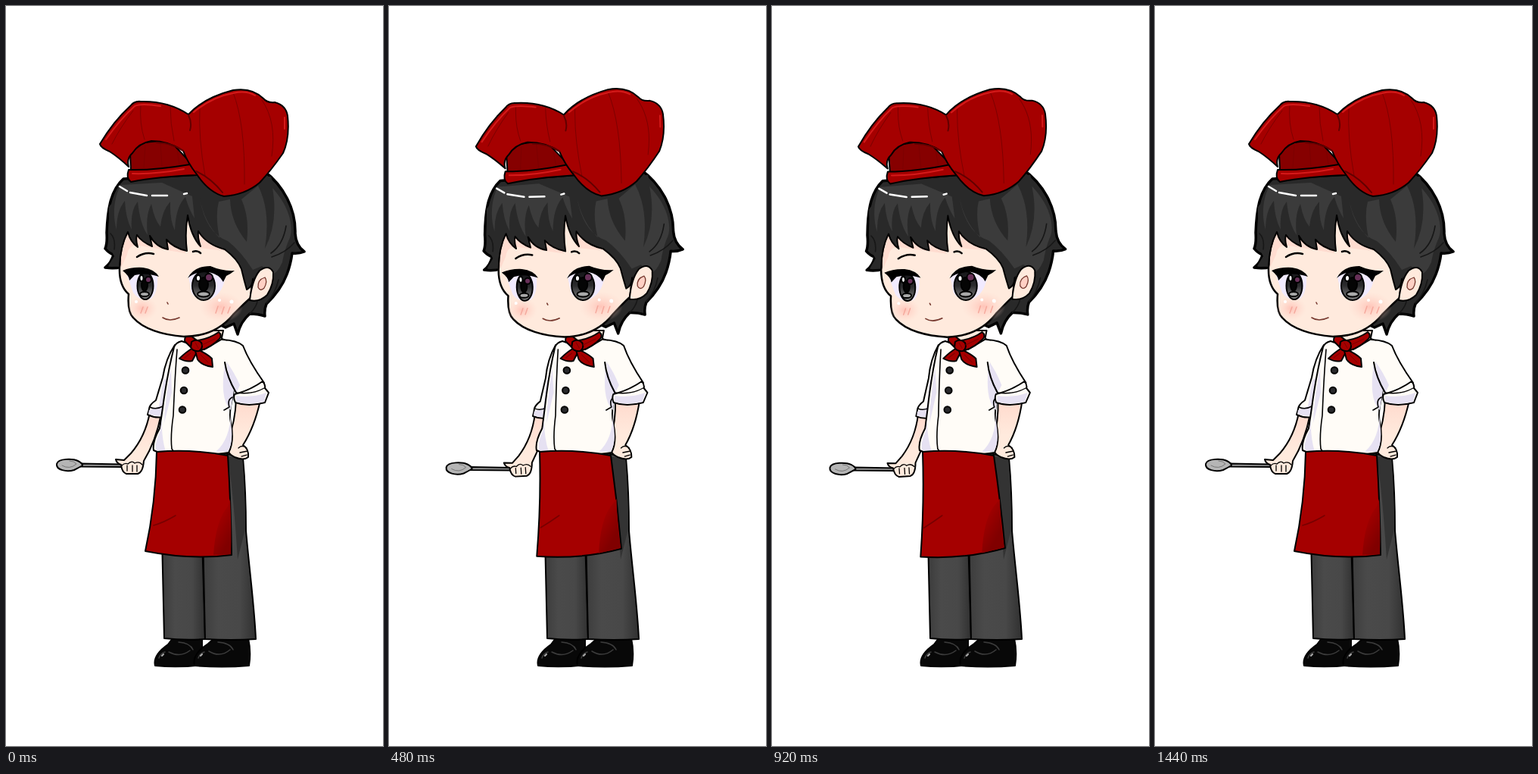
An HTML page for the animation above (1.48 s loop, 498 by 976 pixels).

```html
<!DOCTYPE html>
<html lang="en">
<head>
<meta charset="utf-8">
<title>Chef</title>
<style>
html, body { margin: 0; width: 100%; height: 100%; overflow: hidden; background: #fff; }
svg { display: block; width: 100vw; height: 100vh; }
g { stroke: #000; stroke-width: 2; stroke-linejoin: round; stroke-linecap: round; }
.flat { stroke: none; }
.line { fill: none; }
.skin { fill: #ffeadd; }
.shirt { fill: #fffcf7; }
.lilac { fill: #e6e1f2; stroke: none; }
.red { fill: #a50000; }
.seam { fill: none; stroke: #7d0000; stroke-width: 1; }
.glow { fill: none; stroke: #d51a1a; stroke-width: 2; }
.flush { fill: none; stroke: #f5a99d; stroke-width: 1.5; }
</style>
</head>
<body>
<svg viewBox="0 0 498 976">
  <defs>
    <radialGradient id="blush"><stop stop-color="#ffc4b8"/><stop offset="1" stop-color="#ffd9cd" stop-opacity="0"/></radialGradient>
    <linearGradient id="iris" x2="0" y2="1"><stop stop-color="#151518"/><stop offset=".5" stop-color="#2c2c2e"/><stop offset="1" stop-color="#858585"/></linearGradient>
    <linearGradient id="leg"><stop stop-color="#3c3c3c"/><stop offset=".3" stop-color="#4a4a4a"/><stop offset=".7" stop-color="#484848"/><stop offset="1" stop-color="#303030"/></linearGradient>
    <linearGradient id="cloth" gradientUnits="userSpaceOnUse" x1="262" y1="680" x2="298" y2="700"><stop stop-color="#a50000"/><stop offset=".35" stop-color="#a00000"/><stop offset="1" stop-color="#800000"/></linearGradient>
    <linearGradient id="arm" x2="0" y2="1"><stop stop-color="#ffd9cc"/><stop offset=".6" stop-color="#ffeadd"/></linearGradient>
  </defs>

  <g id="legs">
    <path fill="#080808" d="M197 870C194 858 204 849 214 842L220 834H259V869Q228 873 197 870Z"/>
    <path fill="#080808" d="M249 870C246 858 256 848 267 841L275 834H320Q324 852 321 870Q285 873 249 870Z"/>
    <path class="line" stroke="#3c3c3c" stroke-width="1.5" d="M215 852Q230 860 243 850M268 851Q283 860 296 849M202 860Q204 854 210 852M254 860Q256 854 262 852M228 839Q243 840 247 849M280 839Q296 840 300 849"/>
    <path class="line" stroke="#aaa" stroke-width="2" d="M206 857L208 855M257 857L259 855"/>
    <path fill="url(#leg)" d="M206 700L209 834Q236 837 263 835L259 700Z"/>
    <path fill="url(#leg)" d="M259 650L263 835Q298 837 330 835C328 790 321 740 317 692Q317 640 313 596L289 590Z"/>
    <path class="flat" fill="#333" d="M293 594L312 597Q316 640 316 690L306 730Q301 650 293 594Z"/>
  </g>

  <g id="foreR">
    <path fill="url(#arm)" d="M304 518Q303 548 293 574Q289 589 302 595Q314 600 320 595Q321 584 313 579Q328 556 336 520Z"/>
    <path class="line" stroke-width="1.3" d="M307 583Q312 578 318 583M309 589L319 587M311 594L318 592"/>
  </g>

  <g id="spoon">
    <path fill="#999" d="M98 603.5L154 604.5V608L98 607.5Z"/>
    <path fill="#b5b5b5" d="M67 604C69 596 89 597 95 600Q101 603 101 606Q96 609 90 612C80 615 66 612 67 604Z"/>
    <path fill="none" stroke="#777" stroke-width="1" d="M74 606Q84 612 93 604Q90 600 84 600"/>
  </g>
  <g id="armL">
    <path fill="url(#arm)" d="M190 536Q184 568 165 590L156 599L145 598Q146 603 152 605Q153 615 159 617H174Q181 615 182 600Q198 574 205 538Z"/>
    <path class="line" stroke-width="1.3" d="M153 606Q157 602 161 604Q166 599 170 603Q176 600 180 605M160 606V613M167 606V614M173 606V614"/>
    <path class="shirt" d="M223 447Q211 465 207 490L198 520Q189 526 189 532L187 539Q197 544 208 542L218 500Z"/>
    <path class="lilac" d="M208 493L202 528L189 533L188 538Q198 542 207 540L216 490Z"/>
    <path class="line" stroke-width="1.5" d="M190 529Q198 533 207 528"/>
  </g>

  <g id="torso">
    <path class="skin" d="M243 428H287L284 442L262 454L243 444Z"/>
    <path class="shirt" d="M232 442Q224 444 222 450Q213 485 207 530L203 557Q193 575 195 586Q211 594 236 590Q270 593 294 589Q302 574 297 550Q294 535 300 514L305 450L286 439L262 453Z"/>
    <path class="lilac" d="M289 472Q282 520 297 533L302 500L299 478ZM297 533Q297 571 277 588L293 588Q301 575 297 550ZM206 545Q205 568 211 588L199 586Q195 580 204 560ZM218 477Q210 520 209 550L219 510Z"/>
    <path class="line" stroke-width="1.6" d="M226 453Q223 490 221 540Q217 567 219 584L223 590M299 516Q292 519 295 529L288 533"/>
    <g fill="#29292c" stroke-width="1.2"><circle cx="237" cy="480.500" r="4.300"/><circle cx="235" cy="507" r="4.300"/><circle cx="233" cy="532.500" r="4.300"/></g>
  </g>

  <g id="sleeveR">
    <path class="flat shirt" d="M286 440L312 447L341 497L304 512L290 478Z"/>
    <path class="lilac" d="M291 469Q301 482 309 500L304 511L294 489Z"/>
    <path class="line" d="M286 440Q305 441 313 448Q321 469 341 497M289 470Q292 490 304 510"/>
    <path class="shirt" d="M302 512Q322 507 339 495Q343 500 342 504L347 510L342 523Q320 529 303 523Q300 517 302 512Z"/>
    <path class="lilac" d="M304 514Q325 517 344 510L341 522Q320 527 304 522Z"/>
    <path class="line" stroke-width="1.4" d="M304 510Q325 513 341 504"/>
  </g>

  <g id="apron">
    <path id="skirt" class="red"/>
    <path id="fold" class="flat" fill="url(#cloth)"/>
    <path id="crease" class="line" stroke="#780000" stroke-width="1.600"/>
  </g>

  <g id="scarf" class="red" stroke-width="1.8">
    <path d="M236 442Q235 435 243 434L252 441L246 452Z"/>
    <path d="M254 441Q270 438 281 430Q286 434 282 439Q271 450 258 454Z"/>
    <path d="M247 451Q238 456 229 465Q238 470 246 468L253 455Z"/>
    <path d="M253 453Q266 459 272 465L273 476Q258 474 253 466L250 455Z"/>
    <path d="M245 443Q252 438 258 444Q261 451 255 455Q247 456 244 450Z"/>
    <path class="seam" d="M259 447L276 439M250 444L254 451M244 458L236 464M257 460L267 470"/>
  </g>

  <g id="head">
    <path fill="#292929" stroke-width="3.500" d="M155 228C137 244 134 272 133 299Q134 313 131 320Q136 326 142 328Q139 339 131 345Q144 347 152 344L240 400L290 424L301 419L306 433Q310 416 322 406Q333 406 342 409Q341 400 344 393Q363 375 371 354Q376 341 378 326Q387 327 394 324Q383 316 382 300C383 268 367 237 340 217Z"/>
    <path class="skin" stroke-width="2.500" d="M163 285L150 344Q149 369 162 380Q160 403 168 411C181 426 207 434 235 436C266 436 287 423 300 407Q318 389 323 385L327 350L298 275Z"/>
    <path class="flat" fill="#ffdcd0" d="M160 300Q150 326 152 345L160 328Q162 314 176 316L237 326L238 275L255 319L297 324L314 352L300 280L200 270Z"/>
    <ellipse class="flat" fill="url(#blush)" cx="180" cy="399" rx="20" ry="16"/>
    <ellipse class="flat" fill="url(#blush)" cx="284" cy="397" rx="29" ry="20"/>
    <path class="flush" d="M178 405L181 397M184 405L187 397M277 405L280 396M285 406L288 397M293 405L296 397"/>
    <g class="flat" fill="#fff"><circle cx="282" cy="388" r="2"/><circle cx="298" cy="390" r="2.500"/><circle cx="172" cy="390" r="2"/></g>

    <path class="flat" fill="#f1eaff" d="M160 355Q173 345 200 355Q201 378 192 386Q176 390 168 378Z"/>
    <path class="flat" fill="#f1eaff" d="M241 356Q263 344 290 354Q288 378 270 387Q252 389 245 378Z"/>
    <g stroke="#1d1d20" stroke-width="1.5" fill="url(#iris)"><ellipse cx="184" cy="369" rx="10.500" ry="18"/><ellipse cx="261" cy="369" rx="15" ry="19"/></g>
    <g class="flat">
      <g fill="#050505"><ellipse cx="183" cy="368" rx="4" ry="8"/><ellipse cx="261" cy="367" rx="6" ry="9"/></g>
      <g fill="#673058"><circle cx="188" cy="361" r="4"/><circle cx="268" cy="358" r="5"/></g>
      <g fill="#fff"><ellipse cx="179" cy="359" rx="2.500" ry="4"/><ellipse cx="254" cy="359" rx="3" ry="4"/></g>
      <g fill="#aaa"><ellipse cx="183" cy="380" rx="6" ry="3"/><ellipse cx="261" cy="380" rx="8" ry="3.500"/></g>
      <path d="M154 349Q166 344 181 345Q196 347 202 357Q185 351 170 355L163 362Q163 356 154 349Z"/>
      <path d="M240 359Q248 343 270 343Q286 350 302 349Q296 354 291 356L287 364Q282 354 268 351Q249 350 240 359Z"/>
    </g>
    <path class="line" stroke-width="2.500" d="M173 331Q184 324 195 327M247 324Q253 322 257 326"/>
    <path class="line" stroke="#76392f" stroke-width="1.600" d="M207 411Q216 417 229 411M213 391L214 393"/>

    <path id="bangs" fill="#292929" d="M150 344Q151 316 161 298Q164 311 174 318Q171 308 173 302Q179 311 193 317L190 303Q198 318 214 321L212 308Q221 319 239 323Q236 300 240 276Q244 303 257 317Q253 306 254 297Q265 315 289 321Q306 334 311 347Q314 360 318 374Q326 370 326 360Q330 349 345 343L374 300L350 225L165 227L136 265L136 317L143 330L135 343" stroke="none"/>
    <path class="line" d="M150 344Q151 316 161 298Q164 311 174 318Q171 308 173 302Q179 311 193 317L190 303Q198 318 214 321L212 308Q221 319 239 323Q236 300 240 276Q244 303 257 317Q253 306 254 297Q265 315 289 321Q306 334 311 347Q314 360 318 374Q326 370 326 360"/>
    <g class="flat" fill="#3b3b3b">
      <path d="M152 236C143 250 140 275 146 295Q146 270 157 257Q158 280 166 295Q164 270 174 258Q177 288 187 302Q184 276 192 261Q196 282 204 291Q206 270 217 258Q216 282 223 296Q224 265 237 252Q241 267 249 280L246 251L206 233Z"/>
      <path d="M256 254Q262 285 282 306Q276 277 281 258L296 255Q297 286 318 311Q322 279 311 255L333 237Q350 270 342 320Q360 285 352 240C375 265 382 295 373 310Q367 325 365 338Q355 360 347 350L338 343L326 348Q310 323 293 310Q264 300 256 254Z"/>
    </g>
    <path class="line" stroke="#171717" stroke-width="1.600" d="M138 300Q145 307 143 321M370 290Q366 315 350 326M381 312Q370 325 351 331M344 392Q356 379 360 361M322 406Q330 398 332 390"/>
    <path class="line" stroke="#fff" stroke-width="2.500" d="M150 238L160 244M164 246L186 250M193 250L213 250M235 248L239 247"/>
    <path class="skin" d="M322 388Q325 361 335 349Q347 340 353 351Q354 367 345 381Q335 391 322 388Z"/>
    <path fill="#ffd0c4" stroke="#76392f" stroke-width="1.300" d="M333 371Q332 361 342 358Q346 363 341 372Q336 377 333 371Z"/>

    <g class="red" stroke-width="2.500">
      <path fill="#860000" d="M164 195L176 181L215 176L245 208L246 222L165 218Z"/>
      <path d="M162 216Q196 217 243 209L253 223Q200 225 165 232Q158 227 162 216Z"/>
      <path d="M124 182Q142 152 164 132Q169 125 178 126Q214 125 241 143Q261 121 300 111Q325 107 340 122Q345 128 355 127Q370 131 372 145Q375 174 366 194Q350 217 335 233Q316 249 288 251Q268 246 252 222Q240 207 234 191Q215 178 192 178Q175 181 167 194Q159 201 162 212Q148 199 137 192Q125 187 124 182Z"/>
      <path class="seam" d="M168 138Q151 160 140 182M178 130Q176 155 183 176M217 133Q217 155 222 178M256 134Q254 174 263 224M300 114Q316 155 315 235M338 124Q358 153 351 198M184 184L182 214M204 181L206 212M226 190L229 209"/>
      <path class="glow" d="M132 176Q151 149 170 132Q178 128 204 132M248 140Q272 120 300 115Q317 111 329 118M167 221Q198 222 235 215M368 147L368 162"/>
      <path class="line" stroke="#620000" stroke-width="2" d="M241 144Q246 154 243 164M234 191Q221 181 199 180M251 218Q270 226 286 246"/>
    </g>
  </g>
</svg>
<script>
const LOOP = 1480, STEP = 40, SWAY = LOOP - STEP;
const part = id => document.getElementById(id);
const move = (id, value) => part(id).setAttribute("transform", value);
const draw = (id, d) => part(id).setAttribute("d", d);
// Horizontal shear that keeps the height y in place.
const shear = (id, k, y) => move(id, `matrix(1 0 ${k} 1 ${-k * y} 0)`);

function pose(p) {
  shear("torso", 0.026 * p, 590);
  shear("scarf", 0.026 * p, 590);
  shear("sleeveR", -0.058 * p, 381);
  shear("foreR", 0.094 * p, 590);
  move("armL", `translate(${-3.5 * p}) rotate(${-4.8 * p} 222 450)`);
  move("spoon", `translate(${11.5 * p} ${6 * p})`);
  move("head", `translate(${-4.3 * p}) rotate(${-1.8 * p} 260 435)`);

  const left = [184 + 15 * p, 719 + 9 * p], right = [298 + 12 * p, 724 - 11 * p];
  draw("skirt", `M199 588Q246 584 293 593Q${297 + 6 * p} 655 ${right}Q${245 + 11 * p} ${731 - 1 * p} ${left}Q${198 + 4 * p} 655 199 588Z`);
  draw("fold", `M293 660Q${277 + 3 * p} 678 ${274 + 4 * p} ${724 - 3 * p}L${right[0] - 1} ${right[1] - 1}Q${298 + 5 * p} 690 ${296 + 6 * p} 650Z`);
  draw("crease", `M${195 + 7 * p} ${685 + 4 * p}Q${209 + 4 * p} 681 ${224 + p} 672`);
}

function frame(now) {
  const t = Math.floor((now % LOOP) / STEP) * STEP;
  pose((1 - Math.cos(2 * Math.PI * t / SWAY)) / 2);
  requestAnimationFrame(frame);
}
requestAnimationFrame(frame);
</script>
</body>
</html>
```
